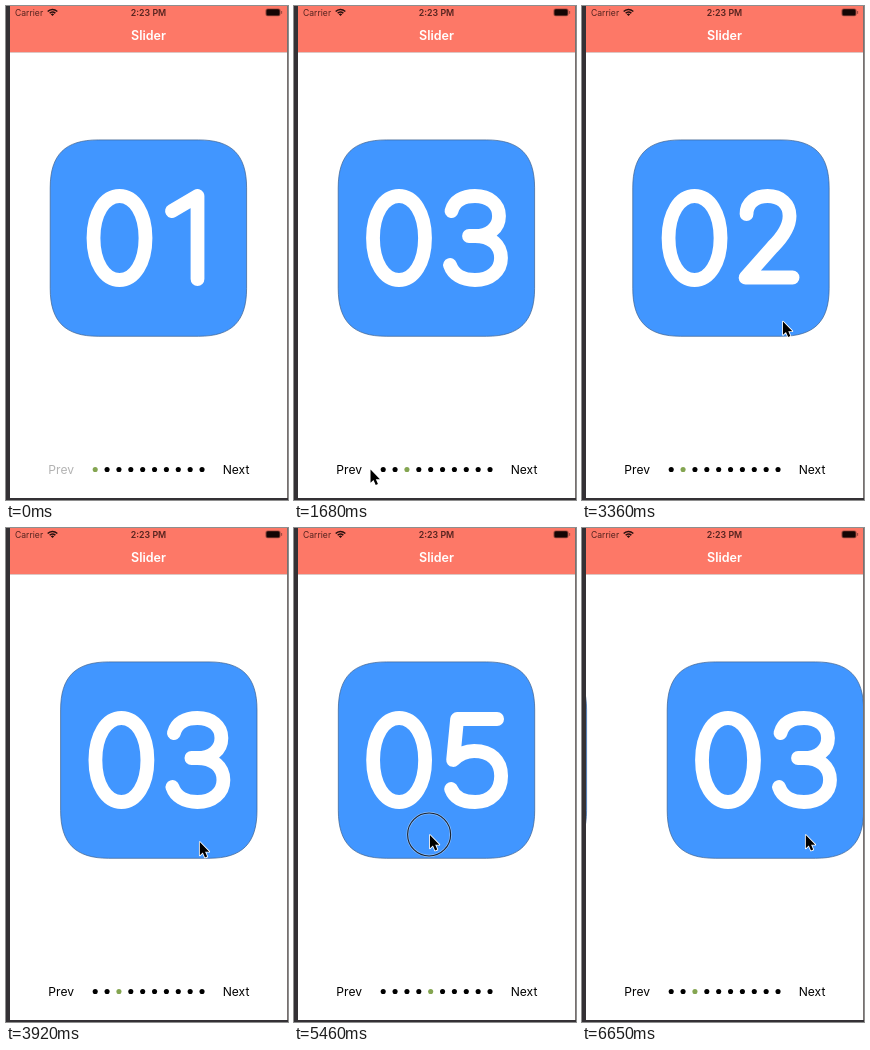
Recreate the animation shown at these times as an HTML page with a canvas. Size 282x494 px, loop 6720 ms.

```html
<!DOCTYPE html>
<html lang="en">
<head>
<meta charset="utf-8">
<title>Slider</title>
<style>
  html, body { margin: 0; width: 100%; height: 100%; overflow: hidden; background: #fff; }
  canvas { display: block; width: 282px; height: 494px; }
</style>
</head>
<body>
<canvas id="stage"></canvas>
<script>
const W = 282, H = 494, LOOP = 6720, STEP = 70;
const LEFT = 4, PAGE = 277, FONT = 'Inter, "Liberation Sans", sans-serif';
const canvas = document.getElementById('stage');
const ctx = canvas.getContext('2d');
const dpr = window.devicePixelRatio || 1;
canvas.width = W * dpr;
canvas.height = H * dpr;

// Centre of the zero and centre line of the second digit, per page
const pages = [
  [113.5, 'M166 205 L191.5 190 V273'],
  [106, 'M158 208 C158 197 167 190 179 190 C192 190 201 198 201 210 C201 222 193 232 184 241 L157 271.5 H204'],
  [105, 'M157.5 205 C160 195 169 190 181 190 C195 190 205 198 205 210 C205 222 195 230 181 230 H175 H181 C197 230 207 239 207 252 C207 265 196 274 181 274 C168 274 159 268 156 259'],
  [103, 'M196 274 V190 H189 L153 253 H209'],
  [105, 'M203 191 H163 L159 232 C165 226 172 223 180 223 C197 223 207 233 207 248 C207 263 197 274 181 274 C168 274 160 269 157 261']
].map(([zero, d]) => ({ zero, digit: new Path2D(d) }));
const arrow = new Path2D('M0 0 V13.2 L3 10.4 L5.2 15.4 L7.4 14.5 L5.3 9.6 H9.4 Z');

// Gestures in order: two taps on each button, four swipes on, three back
const gestures = [];
let current = 0;

function add(at, length, step, x, dx, y) {
  gestures.push({ at, end: at + length, from: current, to: current + step, x, dx, y });
  current += step;
}

const tap = (at, step) => add(at, 110, step, step > 0 ? 229 : 58, 0, 463);
tap(530, 1);
tap(1040, 1);
tap(1726, -1);
tap(2276, -1);
for (let i = 0; i < 4; i++) add(2940 + i * 597, 140, 1, 260 - i * 7, -60, 315 - i * 1.5);
for (let i = 0; i < 3; i++) add(5455 + i * 517.5, 160, -1, 135 + i * 23.5, 41, 306.5);

const clamp = v => Math.max(0, Math.min(1, v));
const mix = (a, b, p) => a + (b - a) * p;
const smooth = p => p * p * (3 - 2 * p);
const easeInOut = p => p < 0.5 ? 4 * p ** 3 : 1 - 4 * (1 - p) ** 3;
const dragged = (g, t) => g.dx * smooth(clamp((t - g.at) / (g.end - g.at)));

// The pointer rests after a gesture, then travels to the next one
function pointer(t, last) {
  const a = last || { end: 0, x: 234, dx: 0, y: 500 };
  const b = gestures[gestures.indexOf(last) + 1];
  const x = last ? a.x + dragged(a, t) : a.x;
  if (!b || t < a.end) return [x, a.y];
  const p = smooth(clamp(((t - a.end) / (b.at - a.end) - 0.6) / 0.4));
  return [mix(x, b.x, p), mix(a.y, b.y, p)];
}

function scroll(t, g) {
  if (!g) return { pos: 0, page: 0 };
  const { from, to, end, dx } = g;
  if (!dx) {
    return { pos: mix(from, to, easeInOut(clamp((t - end) / 300))), page: t < end ? from : to };
  }
  let pos = from - dragged(g, t) / PAGE;
  if (t > end) pos = mix(to, pos, Math.exp((end - t) / 80));
  return { pos, page: Math.round(pos) };
}

function rect(x, y, w, h, color) {
  ctx.fillStyle = color;
  ctx.fillRect(x, y, w, h);
}

function pill(x, y, w, h, r, color) {
  ctx.beginPath();
  ctx.roundRect(x, y, w, h, r);
  ctx.fillStyle = color;
  ctx.fill();
}

function text(str, x, y, size, weight, color, align = 'left') {
  ctx.font = `${weight} ${size}px ${FONT}`;
  ctx.textAlign = align;
  ctx.fillStyle = color;
  ctx.fillText(str, x, y);
}

function circle(x, y, r) {
  ctx.beginPath();
  ctx.arc(x, y, r, 0, Math.PI * 2);
}

function outline(color, width) {
  ctx.strokeStyle = color;
  ctx.lineWidth = width;
  ctx.stroke();
}

// Closed shape of four bezier corners of size ex by ey
function softBox(cx, cy, hw, hh, ex, ey, k) {
  ctx.beginPath();
  for (const [sx, sy] of [[1, -1], [1, 1], [-1, 1], [-1, -1]]) {
    const x = cx + sx * hw, y = cy + sy * hh;
    const onX = h => [x - sx * ex * h, y];
    const onY = h => [x, y - sy * ey * h];
    const [a, b] = sx * sy < 0 ? [onX, onY] : [onY, onX];
    ctx.lineTo(...a(1));
    ctx.bezierCurveTo(...a(1 - k), ...b(1 - k), ...b(1));
  }
  ctx.closePath();
}

function card({ zero, digit }, dx) {
  ctx.save();
  ctx.translate(dx, 0);
  softBox(142.4, 232.1, 98.2, 98.2, 48, 48, 0.69);
  ctx.fillStyle = '#4196ff';
  ctx.fill();
  outline('#3c6190', 0.7);
  ctx.lineCap = ctx.lineJoin = 'round';
  softBox(zero, 232, 26, 42, 26, 42, 0.58);
  outline('#fff', 13.8);
  ctx.stroke(digit);
  ctx.restore();
}

function slides(pos) {
  ctx.save();
  ctx.beginPath();
  ctx.rect(LEFT, 46, PAGE, 446);
  ctx.clip();
  pages.forEach((page, i) => {
    if (Math.abs(i - pos) < 1) card(page, (i - pos) * PAGE);
  });
  ctx.restore();
}

function header() {
  const ink = '#54231f', dark = '#28100e';
  rect(LEFT, 0, PAGE, 46, '#fd7867');
  rect(LEFT, 46, PAGE, 0.6, '#c9a19b');
  text('Carrier', 9, 10, 8.6, 400, ink);
  text('2:23 PM', 142.5, 10, 8.8, 600, ink, 'center');
  text('Slider', 142.5, 34.3, 12.5, 600, '#fff', 'center');

  ctx.lineCap = 'butt';
  for (const r of [1.2, 3.9, 6.6]) {
    ctx.beginPath();
    ctx.arc(46.5, 10, r, -Math.PI * 0.76, -Math.PI * 0.24);
    outline(dark, r < 2 ? 2.4 : 1.5);
  }
  pill(259.4, 2.5, 15.2, 7.8, 2.2, '#a34e43');
  pill(260.4, 3.3, 13.2, 6.2, 1.5, '#140504');
  rect(275.2, 5, 0.9, 2.8, '#8c4038');
}

function footer(page, sinceFirst) {
  const alpha = page ? 1 : mix(0.05, 0.3, clamp((sinceFirst - 30) / 270));
  text('Prev', 42.3, 468, 12.1, 400, `rgba(0,0,0,${alpha})`);
  text('Next', 216.7, 468, 12.1, 400, '#000');
  for (let i = 0; i < 10; i++) {
    circle(89.2 + i * 11.87, 463.5, 2.55);
    ctx.fillStyle = i === page ? '#84a551' : '#000';
    ctx.fill();
  }
}

function cursor(x, y, pressed) {
  ctx.save();
  ctx.translate(x, y);
  if (pressed) {
    circle(0, 0, 21.5);
    outline('rgba(255,255,255,.4)', 2.4);
    outline('#1a222e', 1.1);
  }
  ctx.translate(0.8, 0.6);
  ctx.lineJoin = 'round';
  ctx.strokeStyle = '#fff';
  ctx.lineWidth = 1.7;
  ctx.stroke(arrow);
  ctx.fillStyle = '#000';
  ctx.fill(arrow);
  ctx.restore();
}

function draw(t) {
  const last = gestures.filter(g => g.at <= t).pop();
  const { pos, page } = scroll(t, last);
  ctx.setTransform(dpr, 0, 0, dpr, 0, 0);
  rect(0, 0, W, H, '#fff');
  slides(pos);
  header();
  footer(page, last && !last.dx ? t - last.end : LOOP);
  rect(0, 0, LEFT, H, '#343135');
  rect(281, 0, 1, H, '#77706f');
  rect(0, 492, W, 2, '#343135');
  cursor(...pointer(t, last), last && t < last.end);
}

const start = performance.now();
function tick() {
  const t = (performance.now() - start) % LOOP;
  draw(Math.floor(t / STEP) * STEP);
  requestAnimationFrame(tick);
}
tick();
</script>
</body>
</html>
```
